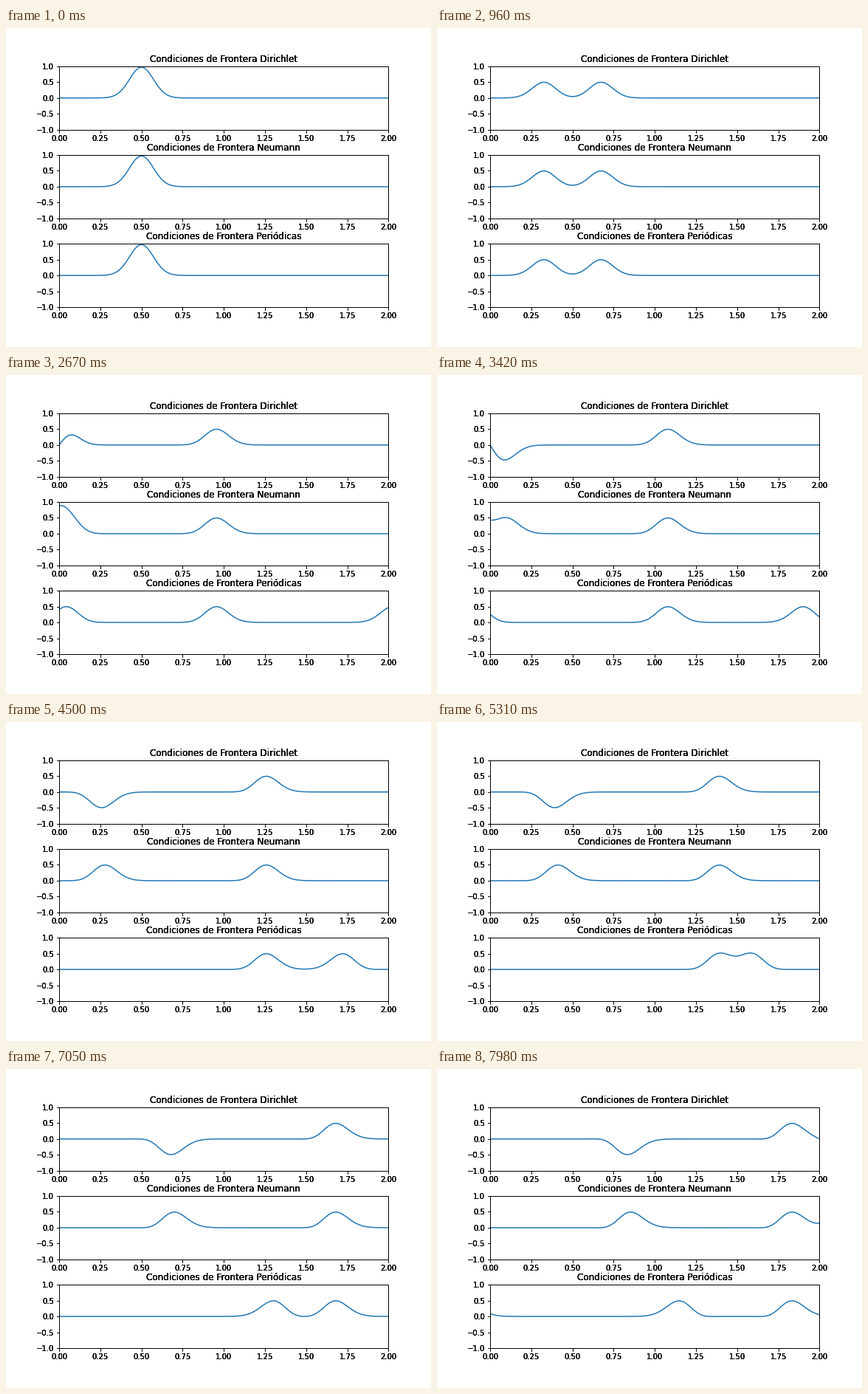
These frames come from a looping animation (576 px wide and 432 px high, 8 s). A matplotlib script:

```python
import numpy as np
import matplotlib.pyplot as plt
from matplotlib.animation import FuncAnimation

FRAMES, LOOP_MS = 267, 8000
LEAD = 3                       # time steps already done in the first picture
N, DT = 101, 0.005
x = np.linspace(0, 2, N)
RATIO = (DT / (x[1] - x[0])) ** 2


def dirichlet(u):
    u[0] = u[-1] = 0


def neumann(u):
    u[0], u[-1] = u[1], u[-2]


def periodic(u):
    u[0], u[-1] = u[-2], u[1]


def laplacian(u):
    out = np.zeros_like(u)
    out[1:-1] = u[2:] - 2 * u[1:-1] + u[:-2]
    return out


def solve(boundary):
    """Leapfrog solution of the wave equation, one row per time step."""
    old = np.exp(-100 * (x - 0.5) ** 2)
    now = old + 0.5 * RATIO * laplacian(old)
    boundary(now)
    rows = [old, now]
    while len(rows) < FRAMES + LEAD:
        new = 2 * now - old + RATIO * laplacian(now)
        boundary(new)
        old, now = now, new
        rows.append(new)
    return rows


PANELS = [("Dirichlet", dirichlet), ("Neumann", neumann), ("Periódicas", periodic)]

plt.rcParams["font.family"] = "DejaVu Sans"
fig, axes = plt.subplots(3, 1, figsize=(8, 6), dpi=72)
fig.subplots_adjust(left=0.125, right=0.9, bottom=0.125, top=0.88, hspace=0.4)

for ax, (name, _) in zip(axes, PANELS):
    ax.set_title("Condiciones de Frontera " + name, fontsize=12)
    ax.set(xlim=(0, 2), ylim=(-1, 1),
           xticks=np.arange(0, 2.01, 0.25), yticks=np.arange(-1, 1.01, 0.5))

# Render the axes once and keep them as a dark overlay with heavier edges.
fig.canvas.draw()
gray = np.asarray(fig.canvas.buffer_rgba())[..., 0] / 255.0
overlay = np.zeros(gray.shape + (4,))
overlay[..., 3] = 1 - gray ** 4
fig.figimage(overlay, origin="upper", zorder=5)

lines, waves = [], []
for ax, (_, boundary) in zip(axes, PANELS):
    ax.set_title("")
    ax.set_axis_off()
    lines += ax.plot([], [], color="#1f77b4", lw=1.5)
    waves.append(solve(boundary))
    ax.set(xlim=(0, 2), ylim=(-1, 1))


def update(i):
    for line, rows in zip(lines, waves):
        line.set_data(x, rows[i + LEAD])
    return lines


anim = FuncAnimation(fig, update, frames=FRAMES, interval=LOOP_MS / FRAMES,
                     init_func=lambda: update(0), repeat=True, repeat_delay=0)
plt.show()
```
